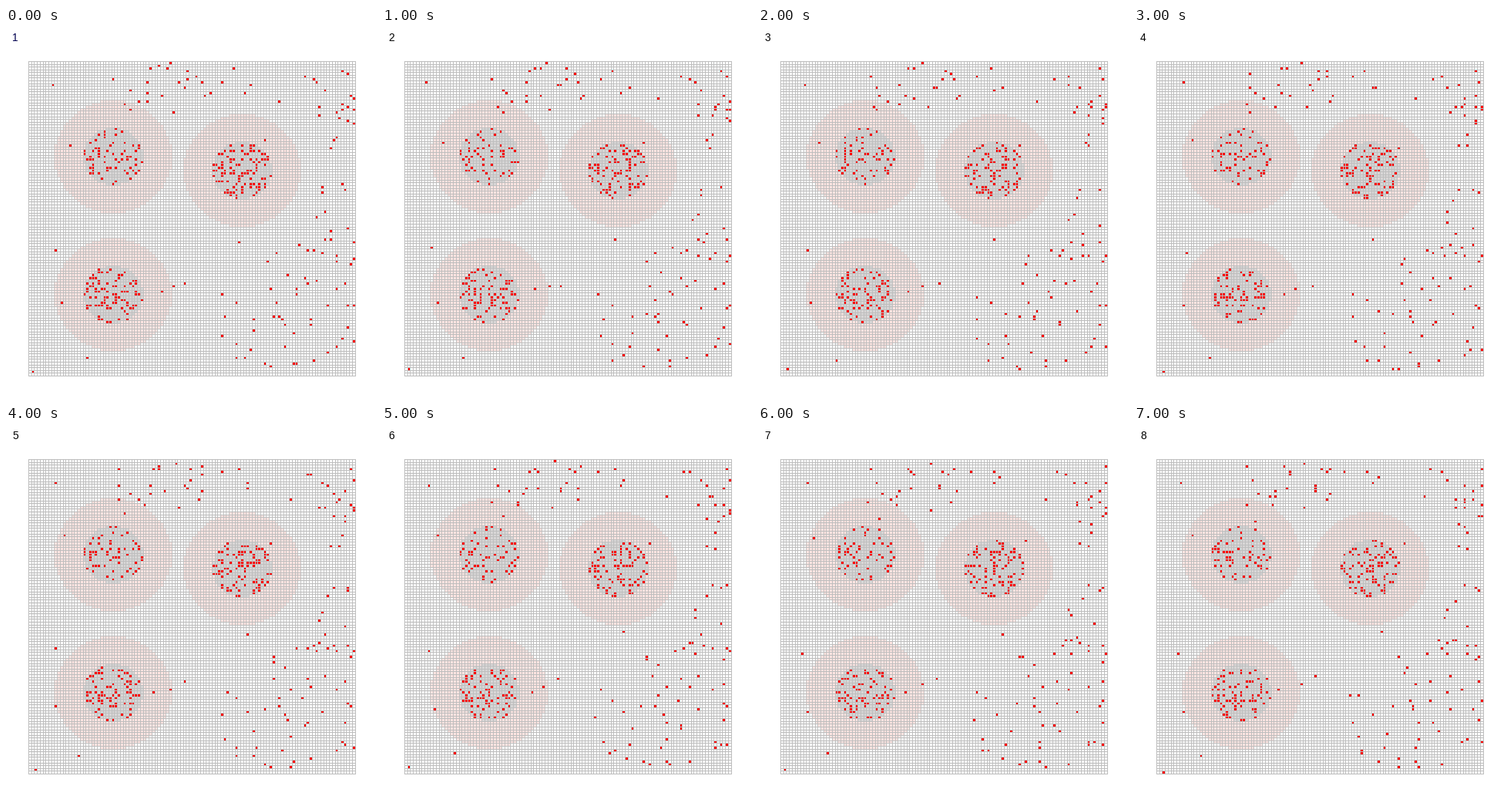
Write a matplotlib script that moves like this. It is 480 by 480 pixels and loops after 8 s.

```python
import numpy as np
import matplotlib.pyplot as plt
from matplotlib.animation import FuncAnimation

SIZE, CELLS, STEPS, ANCHOR = 480, 114, 8, 4
X_SPAN, Y_SPAN = (29, 452.62), (42.985, 450.81)
OUTER_R, CORE_R = 20.5, 10.4
WHITE, LINE, RED = (255, 255, 255), (190, 190, 190), (252, 0, 0)
PINK, GREY = (255, 228, 225), (216, 214, 214)

# nests: column, row, number of agents in the core
NESTS = [(29, 34, 64), (74, 39, 98), (29, 84, 86)]

# loosely filled areas: first and last column, first and last row, agents
AREAS = [(27, 60, 1, 17, 20), (60, 113, 1, 17, 17), (101, 113, 14, 32, 10),
         (101, 112, 46, 66, 9), (85, 113, 67, 81, 17), (64, 113, 82, 111, 36)]

# lone agents: column, row
STRAYS = [(9, 8), (12, 27), (31, 14), (33, 19), (84, 30), (76, 63), (9, 68),
          (9, 89), (43, 84), (49, 83), (54, 80), (17, 107), (2, 112)]

rng = np.random.default_rng(11)


def disc_walk(col, row, count):
    """Walk agents one cell at a time, never leaving the core."""
    spots = np.argwhere(np.hypot(*np.mgrid[-10:11, -10:11]) <= CORE_R) - 10
    pos = rng.choice(spots, count, replace=False)
    path = [pos]
    for _ in range(STEPS - 1):
        new = pos + rng.integers(-1, 2, pos.shape)
        inside = np.hypot(*new.T) <= CORE_R
        pos = np.where(inside[:, None], new, pos)
        path.append(pos)
    return np.array(path) + (col, row)


def scatter(c0, c1, r0, r1, count):
    return rng.integers((c0, r0), (c1 + 1, r1 + 1), (count, 2))


def free_walk(start):
    """Random walk that passes through the start cells at the anchor step."""
    walk = rng.integers(-1, 2, (STEPS, *start.shape)).cumsum(axis=0)
    return np.clip(start + walk - walk[ANCHOR], 0, CELLS - 1)


roamers = np.vstack([STRAYS] + [scatter(*area) for area in AREAS])
paths = np.concatenate([disc_walk(*nest) for nest in NESTS]
                       + [free_walk(roamers)], axis=1)


def axis_cells(lo, hi):
    """Pixels along one axis, their cell indices, and which ones are lines."""
    edges = np.round(np.linspace(lo, hi, CELLS + 1)).astype(int)
    pixels = np.arange(edges[0], edges[-1] + 1)
    index = np.searchsorted(edges, pixels, side="right") - 1
    return pixels, np.minimum(index, CELLS - 1), np.isin(pixels, edges)


xs, cols, col_line = axis_cells(*X_SPAN)
ys, rows, row_line = axis_cells(*Y_SPAN)
on_line = row_line[:, None] | col_line

gy, gx = np.mgrid[:CELLS, :CELLS]
dist = np.min([np.hypot(gx - c, gy - r) for c, r, _ in NESTS], axis=0)
ground = np.full((CELLS, CELLS, 3), WHITE, dtype=np.uint8)
ground[dist <= OUTER_R] = PINK
ground[dist <= CORE_R] = GREY


def render(step):
    cells = ground.copy()
    x, y = paths[step].T
    cells[y, x] = RED
    board = cells[np.ix_(rows, cols)]
    board[on_line] = LINE
    image = np.full((SIZE, SIZE, 3), WHITE, dtype=np.uint8)
    image[np.ix_(ys, xs)] = board
    return image


fig = plt.figure(figsize=(4.8, 4.8), dpi=100, facecolor="white")
ax = fig.add_axes([0, 0, 1, 1])
ax.axis("off")
picture = ax.imshow(render(0), extent=(0, SIZE, SIZE, 0),
                    interpolation="nearest", aspect="auto")
label = ax.text(8, 17, "1", family="Liberation Sans", size=10,
                va="baseline", ha="left")


def update(step):
    picture.set_data(render(step))
    label.set_text(str(step + 1))
    label.set_color("black" if step else "#000050")
    return picture, label


anim = FuncAnimation(fig, update, frames=STEPS, interval=1000,
                     repeat=True, repeat_delay=0)
plt.show()
```
